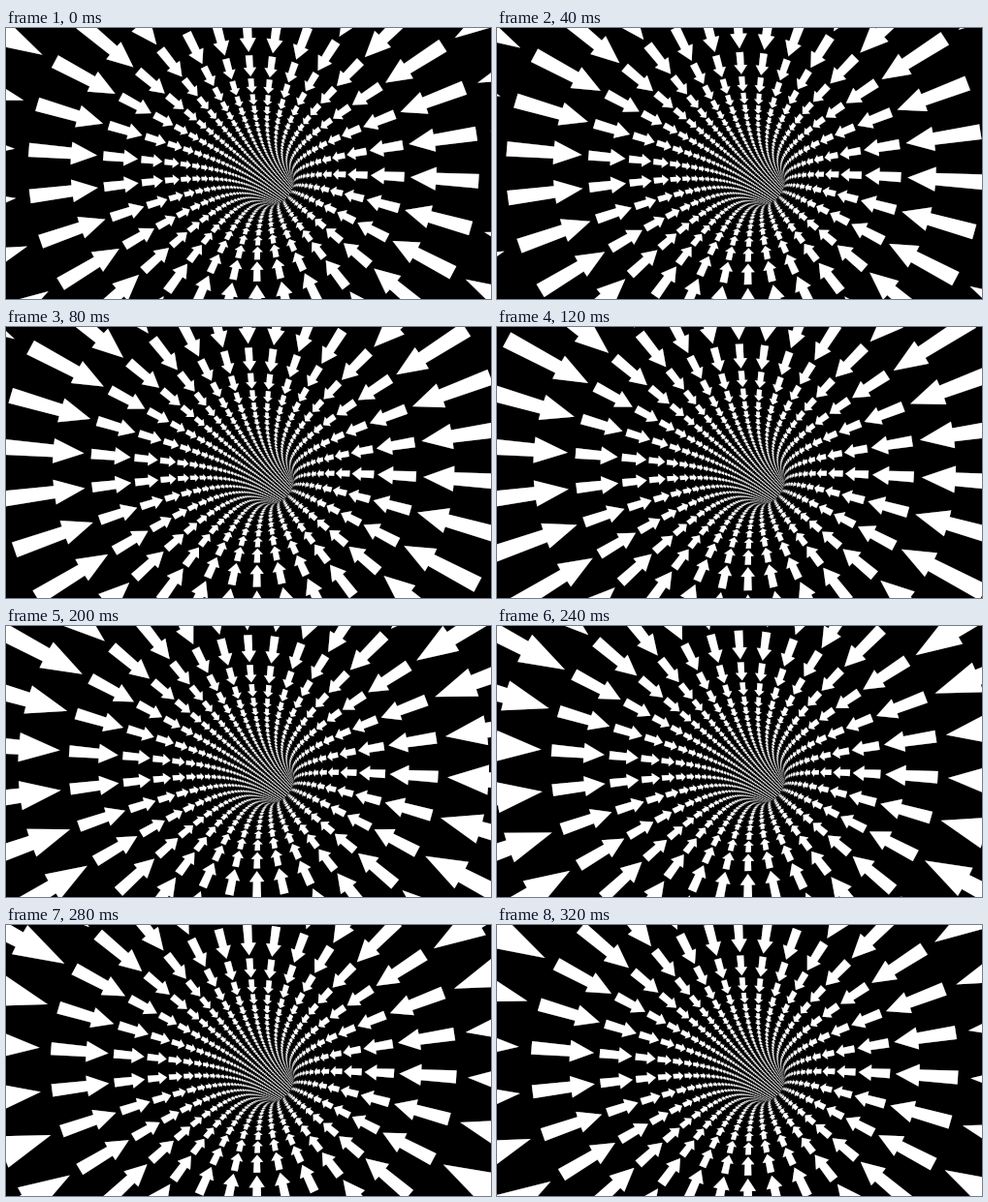
Animation, 500 px wide and 280 px high, one loop 0.36 s. Source, as an HTML page with a canvas:

```html
<!DOCTYPE html>
<html lang="en">
<head>
<meta charset="utf-8">
<title>Arrow tunnel</title>
<style>
  html, body { margin: 0; width: 100%; height: 100%; overflow: hidden; background: #000; }
  canvas { display: block; filter: url(#light); }
  svg { position: absolute; }
</style>
</head>
<body>
<svg width="0" height="0">
  <filter id="light" x="0" y="0" width="1" height="1" color-interpolation-filters="sRGB">
    <feComponentTransfer>
      <feFuncR type="gamma" exponent="0.6"/>
      <feFuncG type="gamma" exponent="0.6"/>
      <feFuncB type="gamma" exponent="0.6"/>
    </feComponentTransfer>
  </filter>
</svg>
<canvas id="stage" width="500" height="280"></canvas>
<script>
const RAD = Math.PI / 180;
const WIDTH = 500, HEIGHT = 280;
const SAMPLES = 4;

// The tunnel is a bent tube of radius 1, seen from its centre line.
const BEND_RADIUS = 60;
const BEND_DIRECTION = 40 * RAD;
const FOCAL = 287;
const ROWS = 30;
const RINGS = 46;
const RING_LENGTH = 0.00213 * FOCAL;
const FIRST_RING = 2.02;
const STEP_MS = 40;
const STEPS = 9;

// Outlines as [distance in rings, angle in degrees].
const CELL = [[-0.07, -6.5], [0.95, -6.5], [0.95, 6.5], [-0.07, 6.5]];
const ARROW = [
  [0, -1.8], [0.47, -1.8], [0.47, -3.6], [0.88, 0],
  [0.47, 3.6], [0.47, 1.8], [0, 1.8]
];

const stage = document.getElementById('stage').getContext('2d');
stage.imageSmoothingQuality = 'high';

function project(ring, angle) {
  const turn = Math.max(ring, 0.1) * RING_LENGTH / BEND_RADIUS;
  const radius = BEND_RADIUS - Math.cos(angle);
  const scale = FOCAL / (radius * Math.sin(turn));
  return [
    (BEND_RADIUS - radius * Math.cos(turn)) * scale,
    Math.sin(angle) * scale
  ];
}

function fillRing(ctx, shape, ring, color) {
  ctx.fillStyle = color;
  for (let row = 0; row < ROWS; row++) {
    ctx.beginPath();
    for (const [along, across] of shape) {
      ctx.lineTo(...project(ring + along, row * 2 * Math.PI / ROWS + across * RAD));
    }
    ctx.fill();
  }
}

// Draws one pose enlarged, so that scaling it down smooths the fine arrows.
function renderPose(step) {
  const canvas = document.createElement('canvas');
  canvas.width = WIDTH * SAMPLES;
  canvas.height = HEIGHT * SAMPLES;
  const ctx = canvas.getContext('2d');
  ctx.fillRect(0, 0, canvas.width, canvas.height);
  ctx.scale(SAMPLES, SAMPLES);
  ctx.translate(WIDTH / 2, HEIGHT / 2);
  ctx.rotate(BEND_DIRECTION);

  // Far to near, so the inner wall hides what lies behind the bend.
  for (let i = RINGS; i >= -1; i--) {
    const ring = FIRST_RING + i - step / STEPS;
    fillRing(ctx, CELL, ring, '#000');
    fillRing(ctx, ARROW, ring, '#fff');
  }
  return canvas;
}

const poses = [];
const start = performance.now();
function tick() {
  const step = Math.floor((performance.now() - start) / STEP_MS) % STEPS;
  poses[step] ??= renderPose(step);
  stage.drawImage(poses[step], 0, 0, WIDTH, HEIGHT);
  requestAnimationFrame(tick);
}
tick();
</script>
</body>
</html>
```
